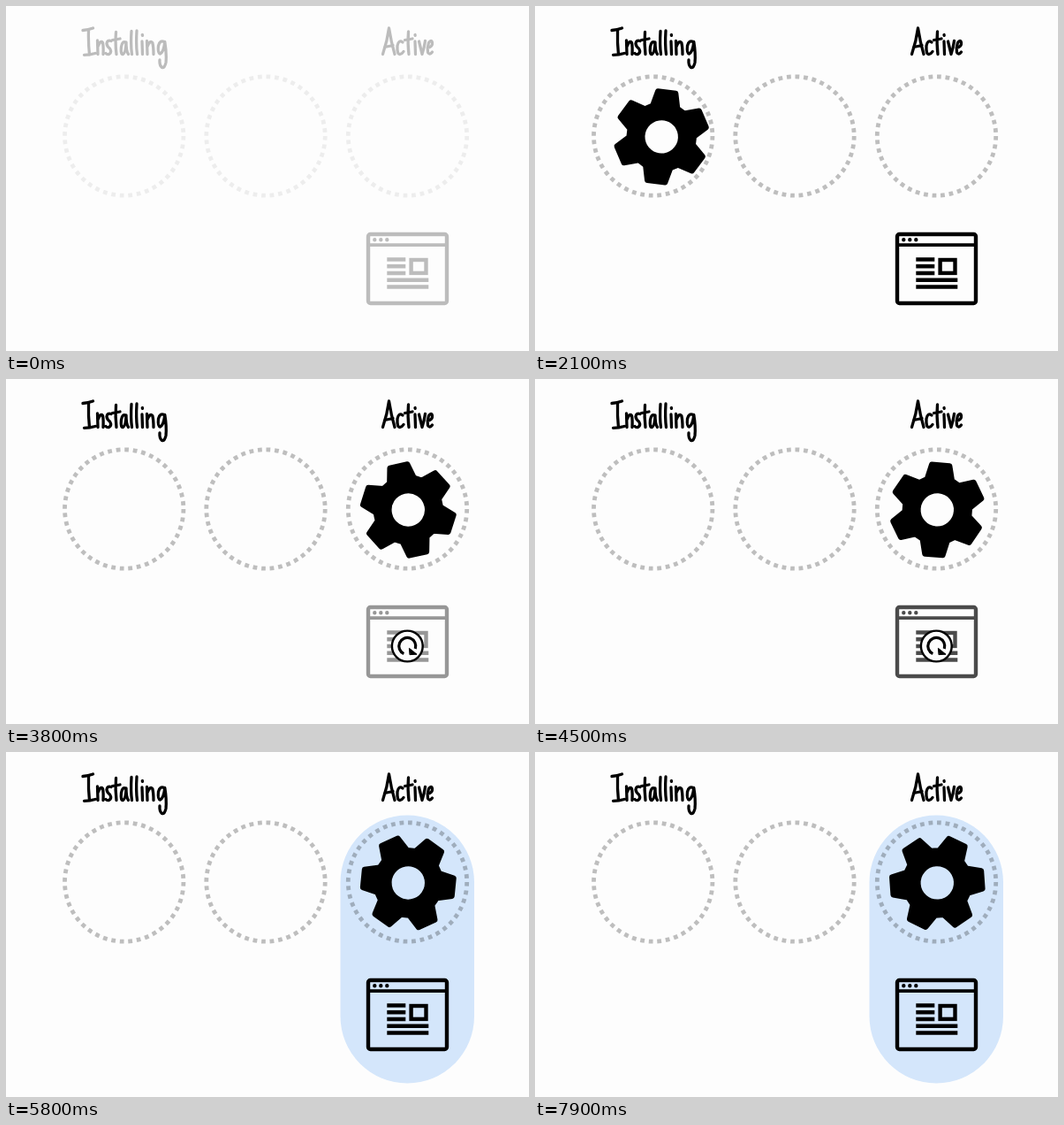
Write an HTML page that moves like this. It is 592 px wide and 390 px high and loops after 8000 ms.

```html
<!DOCTYPE html>
<html lang="en">
<head>
<meta charset="utf-8">
<title>Installing to active</title>
<style>
  html, body { margin: 0; width: 100%; height: 100%; overflow: hidden; background: #fdfdfd; }
  svg { display: block; width: 592px; height: 390px; }
  .line { fill: none; stroke: #000; stroke-linecap: round; stroke-linejoin: round; }
  .label { font: 30px "Open Sans", sans-serif; fill: transparent; }
</style>
</head>
<body>
<svg viewBox="0 0 592 390">
  <rect id="pill" x="378.5" y="71.5" width="151.5" height="303" rx="75.7" fill="#d4e6fb"/>
  <g id="scene">
    <g id="rings" fill="none" stroke="#000" stroke-opacity=".25" stroke-width="4.8"></g>

    <!-- Pen-drawn lettering over selectable text -->
    <text class="label" x="134" y="56" text-anchor="middle">Installing</text>
    <path class="line" stroke-width="3.3" d="
      M87 27.5 Q93 27 98.5 25 M93.5 27 Q93 42 94.5 55 M88.5 55.3 Q95 55.3 101 53.5
      M103.5 39 L104 54.5 M104 46 Q107 38 109.5 41.5 Q110.5 46 110 54.5
      M119 39.5 Q114.5 38 114 42.5 Q114.5 46 117.5 48 Q120 52 117 54.3 Q114.5 55.3 113 53.5
      M124.5 29.5 Q123.5 43 125 54.5 M120.5 38.5 L129 37
      M136 41.5 Q132 38.5 130.5 46 Q129.5 55 132.5 54.5 Q135.5 53 136 41 Q136 51 138.5 54.5
      M142 28.5 Q141 44 142.5 54.5 M148 28 Q147 44 148.5 54.5
      M154 40 L154.5 54.5 M154.3 32.5 l.2 .8
      M159.5 39.5 L160 54.5 M160 46 Q163 38 165.8 41.5 Q167 46 167 54.5
      M179.5 41 Q174.5 37.5 172.5 45 Q171.5 53.5 174.5 54 Q178.5 52 179.8 40.5
      Q182 54 181 64 Q179.5 70.5 176.5 69.5 Q173.5 67 174 61"/>
    <text class="label" x="455" y="56" text-anchor="middle">Active</text>
    <path class="line" stroke-width="3.3" d="
      M426.5 54.5 Q431.5 40 433.5 25 Q436 41 440 54.5 M428.5 46.5 L438 44.5
      M449 41 Q444.5 37.5 443 45 Q442.5 55 446 54.5 Q448.5 54 450 51.5
      M455.5 29 Q454.5 43 456 54.5 M451.5 38.5 L460 37
      M463 40 L463.5 54.5 M463 32.5 l.2 .8
      M467.5 40 Q469.5 48 471 54.5 Q473.5 47 474.5 39.5
      M477.5 47.5 Q483 46 482.5 41.5 Q481.5 37.5 478.5 41.5 Q476.5 47 477.5 52.5 Q479.5 56 482.5 52"/>

    <g id="page" class="line" stroke-width="4.4" style="stroke-linecap:butt">
      <rect x="410" y="258" width="89" height="78" rx="2.5"/>
      <path d="M410 270.2 H499" stroke-width="3.8"/>
      <path d="M417.3 264.3 h.01 M424.3 264.3 h.01 M431.3 264.3 h.01" stroke-linecap="round" stroke-width="4.4"/>
      <path d="M431.3 286.4 H452.3 M431.3 294.3 H452.3 M431.3 302 H452.3 M431.3 309.8 H478.3 M431.3 317.5 H478.3" stroke-width="4.5"/>
      <rect x="458.6" y="287" width="16.9" height="14.9" stroke-linejoin="miter"/>
    </g>
  </g>

  <g id="reload" class="line">
    <circle r="17.4" fill="#fdfdfd" stroke-width="2.4"/>
    <path d="M-4 8.6 A9.5 9.5 0 1 1 9 3" stroke-width="3.2" style="stroke-linecap:butt"/>
    <path d="M2.4 2.6 L10.8 9.2 L3 9.6 Z" fill="#000" stroke-width="1"/>
  </g>
  <path id="gear" class="line" style="fill:#000" fill-rule="evenodd" stroke-width="6"/>
</svg>

<script>
const LOOP = 8000, STEP = 100;
const LEFT = 133.5, RIGHT = 455.3;
const [pill, scene, rings, page, reload, gear] =
  ["pill", "scene", "rings", "page", "reload", "gear"].map(id => document.getElementById(id));

const ramp = (t, start, length) => Math.min(1, Math.max(0, (t - start) / length));
const easeInOut = u => u < .5 ? 4 * u ** 3 : 1 - 4 * (1 - u) ** 3;

// The wide round stroke softens the tooth corners
function gearPath() {
  const points = [];
  for (let tooth = 0; tooth < 6; tooth++) {
    const a = tooth * Math.PI / 3, c = Math.cos(a), s = Math.sin(a);
    for (const [r, w] of [[34, -14.2], [50.7, -10.2], [50.7, 10.2], [34, 14.2]]) {
      points.push((r * c - w * s).toFixed(2) + " " + (r * s + w * c).toFixed(2));
    }
  }
  return "M" + points.join("L") + "ZM21.7 0A21.7 21.7 0 1 0 -21.7 0A21.7 21.7 0 1 0 21.7 0Z";
}

function addRing(x) {
  const ring = document.createElementNS("http://www.w3.org/2000/svg", "circle");
  const r = 67.2, pitch = 2 * Math.PI * r / 44;
  const attrs = { cx: x, cy: 147, r, "stroke-dasharray": `${pitch / 2} ${pitch / 2}` };
  for (const name in attrs) ring.setAttribute(name, attrs[name]);
  rings.append(ring);
}

function draw(t) {
  scene.setAttribute("opacity", .25 + .75 * ramp(t, 0, 300));

  const x = LEFT + (RIGHT - LEFT) * easeInOut(ramp(t, 2000, 510));
  const turn = -13.6 + 24 * t / 1000;
  gear.setAttribute("transform", `translate(${x} 147.9) rotate(${turn})`);
  gear.setAttribute("opacity", ramp(t, 840, 400));

  page.setAttribute("opacity", 1 - .6 * (ramp(t, 2900, 400) - ramp(t, 4300, 400)));

  const shown = ramp(t, 2900, 400) - ramp(t, 4500, 560);
  reload.setAttribute("transform", `translate(454.3 302) scale(${Math.sqrt(shown)})`);
  reload.setAttribute("opacity", Math.min(1, shown * 2));

  pill.setAttribute("opacity", ramp(t, 4800, 400));
}

gear.setAttribute("d", gearPath());
[133.7, 294, 454.5].forEach(addRing);

const begin = performance.now();
function tick() {
  const t = (performance.now() - begin) % LOOP;
  draw(Math.floor(t / STEP) * STEP);
  requestAnimationFrame(tick);
}
draw(0);
requestAnimationFrame(tick);
</script>
</body>
</html>
```
